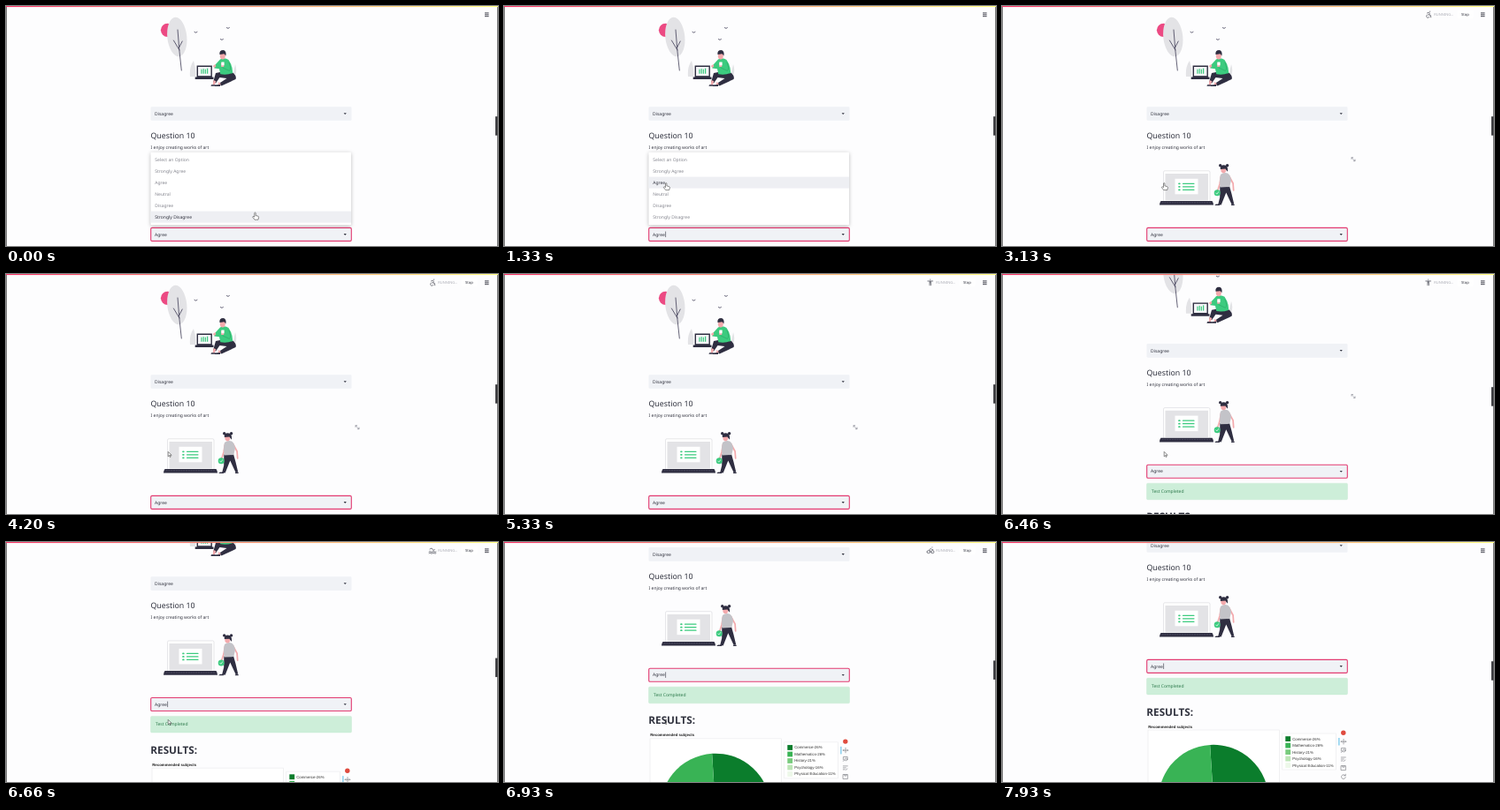
Animation of 556 by 272 pixels, one loop 8000 ms. Source, as an HTML page:

```html
<!DOCTYPE html>
<html lang="en">
<head>
<meta charset="utf-8">
<title>Survey page</title>
<style>
html, body { margin: 0; width: 100%; height: 100%; overflow: hidden; background: #fdfdfe; }
svg { display: block; width: 556px; height: 272px; }
text { font: 5px "Noto Sans", "Open Sans", sans-serif; fill: #31333f; text-rendering: geometricPrecision; }
text.h3 { font-size: 8.8px; }
text.h2 { font-size: 11.75px; font-weight: 700; }
text.plot { font: 4.35px "Liberation Sans", Arial, sans-serif; fill: #333; }
text.title { font-weight: 700; fill: #222; }
.line { fill: none; stroke-linecap: round; stroke-linejoin: round; }
.dark { fill: #2f2e41; } .green { fill: #3ccb7f; } .skin { fill: #f3a9ac; } .grey { fill: #e3e3e6; }
.menu { filter: drop-shadow(0 1px 2px #0004); }
</style>
</head>
<body>
<svg viewBox="0 0 556 272">
  <defs>
    <linearGradient id="bar"><stop stop-color="#f63366"/><stop offset="1" stop-color="#fffd80"/></linearGradient>
    <path id="caretDown" d="M381.6 -.8h3.2l-1.6 1.8z" fill="#31333f"/>
  </defs>

  <g id="page">
    <!-- man under a tree -->
    <circle cx="182.5" cy="27.3" r="7.6" fill="#ec4a83"/>
    <ellipse class="grey" cx="193.3" cy="35" rx="11" ry="22.3" transform="rotate(-6 193.3 35)"/>
    <path class="line" d="M194 27Q195.5 50 198.3 73M195.6 47l3.6-7M196 50l-6.6-11" stroke="#3f3d56" stroke-width=".8"/>
    <path class="line" d="M213 29.4l1.6.8 1.4-.9M249.4 24.6l1.6.8 1.4-.9M242.4 37.6l1.6.8 1.4-.9" stroke="#3f3d56" stroke-width=".8"/>
    <path class="grey" d="M208 80q-1-11 4-18q3 9 2 18zM256 80q2-9 3-14q3 8-1 16z"/>
    <path class="dark" d="M215.6 67.6h17.3v12.8h1.6v2.6h-20.800v-2.6h1.900z"/>
    <path d="M217 69h14.500v10.200h-14.500z" fill="#f4f5f7"/>
    <path class="line" d="M221 72.200v4M223.200 71.500v4.700M225.400 72.200v4M227.600 71v5.200" stroke="#3ccb7f" stroke-width="1.200"/>
    <path class="dark" d="M237 76q10-3 20 0q4 4 2.500 7l-16 7.500-3-2.500 9-6-8-1-4.500 6.500-3-1z"/>
    <path class="skin" d="M234.500 84l2.800 1.200-1.500 4h-2.200zM240.500 86l2.500 2.400-3.600 1.600z"/>
    <path class="dark" d="M232 89.200h4.500v1.600h-5zM236.500 89.500l5.500-.5v2h-6z"/>
    <path class="green" d="M242 60.500q5-2.500 9.500.5q4.500 6 4.800 15q-7 2.600-14 1.200l-1.300-6-5.500-.8q-1.500-2 .6-3.400z"/>
    <path class="line" d="M252 64q3 7 .5 9.500l-7.500-3.500" stroke="#31b56f" stroke-width="1"/>
    <path class="skin" d="M233.800 68l2.600-2 1 2.200-2 2zM243.200 64h3v5h-3z"/>
    <path d="M243.400 63.500h3.200v3.800h-3.200z" fill="#fff"/>
    <ellipse class="skin" cx="244.800" cy="56.500" rx="3" ry="4"/>
    <path class="dark" d="M241.400 55q-.6-5 4-5 4 .5 3 6.500l-1.800-2.200z"/>

    <!-- first select and second question -->
    <rect x="163.500" y="114.200" width="227" height="15.600" rx="1.300" fill="#f0f2f6"/>
    <text x="168" y="123.800">Disagree</text>
    <use href="#caretDown" y="122"/>
    <text class="h3" x="163.500" y="150">Question 10</text>
    <text x="163.600" y="161.800">I enjoy creating works of art</text>

    <!-- woman beside a laptop -->
    <rect x="182.500" y="186.800" width="52.500" height="35" rx="1.500" fill="#fff" stroke="#dcdce0" stroke-width=".7"/>
    <path class="grey" d="M184.500 190h48.500v30.500h-48.500z"/>
    <path d="M195.500 195.800h26v17.500h-26z" fill="#fff"/>
    <path class="line" d="M204.500 201.300h12.500M204.500 204.800h12.500M204.500 208.300h12.500" stroke="#3ccb7f" stroke-width="1.200"/>
    <path class="line" d="M200 201.300h.8M200 204.800h.8M200 208.300h.8" stroke="#3ccb7f" stroke-width="1.700"/>
    <path class="dark" d="M179.500 221h58q1.500 2 1.500 4.600h-61q0-2.600 1.500-4.600z"/>
    <path class="line" d="M181 222.800h55" stroke="#55546a" stroke-width=".7" stroke-dasharray="1.200 1.600"/>
    <path class="line" d="M256.500 192.500l4.600 8.500.6 8M247.500 193l-1.500 9-2.500 8" stroke="#f3a9ac" stroke-width="1.700"/>
    <path class="dark" d="M246.300 204.500l10.700-.5 2.500 9 2.700 11.300-2.600.6-6.300-13.500-5.600 14.200-3.500-.6 2-8z"/>
    <path class="dark" d="M242 224.600l4 .2v1.300h-5.800zM259.600 224.600h2.800l.4 1.500h-4z"/>
    <path d="M247 191q3.500-3 8-1.500 3.200 2 4 8l-1.700 7.500-10.600.5q-1.400-8 .3-14.500z" fill="#c3c3c8"/>
    <ellipse class="skin" cx="250.300" cy="185.600" rx="3" ry="3.800"/>
    <path class="dark" d="M246.800 185q-.6-4.600 4-4.700 5 .2 4.200 7.500l-2.600-3.200z"/>
    <circle class="dark" cx="246.700" cy="180.800" r="1.700"/><circle class="dark" cx="254.600" cy="180.800" r="1.700"/>
    <circle class="green" cx="243.200" cy="211.800" r="3.500"/>
    <path class="line" d="M241.700 212l1.100 1.200 2-2.600" stroke="#fff" stroke-width=".7"/>
    <path id="expand" class="line" d="M395 173.400v-1.700h1.700M395.200 171.900l1.500 1.500M399 174v1.700h-1.700M398.800 175.500l-1.500-1.500" stroke="#777985" stroke-width=".6"/>

    <!-- focused select -->
    <rect x="163.700" y="251.400" width="226.600" height="15" rx="1.300" fill="#f0f2f6" stroke="#e23a70" stroke-width="1.100"/>
    <text x="168" y="260.500">Agree</text>
    <path id="caret" d="M182.600 255.500v6.500" stroke="#31333f" stroke-width=".6"/>
    <use href="#caretDown" y="258.900"/>

    <!-- results -->
    <rect x="163.500" y="272.300" width="227" height="18.600" rx="1.300" fill="#cdeed9" stroke="#c2e8d0" stroke-width=".4"/>
    <text x="169" y="283.300" style="fill:#2d7a4c">Test Completed</text>
    <text class="h2" x="163.300" y="314.600">RESULTS:</text>
    <text class="plot title" x="165.200" y="328.500">Recommended subjects</text>
    <rect x="165" y="331" width="148.500" height="148" fill="#fff" stroke="#e4e4e6" stroke-width=".5"/>
    <g id="pie"></g>
    <rect x="316.800" y="335" width="60.500" height="41" fill="#fff" stroke="#e6e6e8" stroke-width=".5"/>
    <g id="legend"></g>
    <circle cx="385.800" cy="334.200" r="2.700" fill="#df4b3f"/>
    <path d="M380.900 340v8.500" stroke="#26aae1" stroke-width=".8"/>
    <g class="line" stroke="#85868c" stroke-width=".7">
      <path d="M383.200 344.200h5.600M386 341.400v5.600M384 343.400l-.8.800.8.800M388 343.400l.8.800-.8.800"/>
      <path d="M383.400 355v-3.400h4.800v2.500M383.400 356.500l1.600-1.600"/><circle cx="386.500" cy="354.500" r="1.400"/>
      <path d="M383.300 362h5M383.300 364h3M383.300 366h2M388 365l-1.600 1.400"/>
      <path d="M383.400 371.600h5v5h-5zM384.800 371.600v1.500h2.200v-1.500"/>
      <path d="M387.800 382.600a2.400 2.400 0 1 0 .5 2M388.300 381.200v1.600h-1.600"/>
    </g>
  </g>

  <g id="menu">
    <rect class="menu" x="163.500" y="165.800" width="226.500" height="82.400" rx="1" fill="#fff"/>
    <rect id="hover" x="163.500" width="226.500" height="13" fill="#eeeff3"/>
    <g id="options"></g>
  </g>

  <g id="status">
    <path id="icon" class="line" stroke="#6f7079" stroke-width=".9"/>
    <text x="488.300" y="11" style="font-size:4px;fill:#a9aab3">RUNNING...</text>
    <rect x="514.500" y="4.800" width="18" height="9" rx="1" fill="#fff"/>
    <text x="519" y="11" style="font-size:4.200px">Stop</text>
  </g>
  <path d="M541 7.900h4.600M541 9.800h4.600M541 11.700h4.600" stroke="#31333f" stroke-width=".9"/>
  <rect id="thumb" x="553" width="2.300" height="21.500" fill="#3c3c40"/>
  <path d="M.3 0v272M555.700 0v272" stroke="#111" stroke-width=".7"/>
  <rect width="556" height="1.100" fill="url(#bar)"/>

  <g id="cursor" fill="#fff" stroke="#222" stroke-width=".5" stroke-linejoin="round">
    <path id="hand" d="M-.7.500q.7-.9 1.400 0v3l2.800.7q.8.400.6 1.500l-.6 2.500h-4l-2.300-3q.2-1.200 1.400-.6l.7.600z"/>
    <path id="arrow" d="M0 1v5.400l1.300-1.200.8 1.900.9-.4-.8-1.800h1.700z"/>
    <path id="beam" fill="none" d="M-.9.800h1.800M0 .800v5.200M-.9 6h1.800"/>
  </g>
</svg>
<script>
const $ = id => document.getElementById(id);
const clamp = v => Math.max(0, Math.min(1, v));
const ramp = (t, from, to) => clamp((t - from) / (to - from));
const smooth = u => u * u * (3 - 2 * u);
const show = (id, on) => $(id).setAttribute('opacity', +on);

const options = ['Select an Option', 'Strongly Agree', 'Agree', 'Neutral', 'Disagree', 'Strongly Disagree'];
$('options').innerHTML = options.map((s, i) => `<text x="168.300" y="${176 + 13 * i}">${s}</text>`).join('');
const rows = [...$('options').children];

const subjects = [
  ['Commerce', 26, '#0b7d2c'], ['Mathematics', 26, '#39b355'], ['History', 21, '#78cb7d'],
  ['Psychology', 16, '#bce5b6'], ['Physical Education', 11, '#edf8e9']
];
let turn = 0;
const rim = p => {
  const a = p / 50 * Math.PI;
  return `${239 + 62.2 * Math.cos(a)} ${410 - 62.2 * Math.sin(a)}`;
};
subjects.forEach(([name, share, color], i) => {
  const y = 338.2 + 7.5 * i;
  $('pie').innerHTML += `<path fill="${color}" d="M239 410L${rim(turn)}A62.2 62.2 0 0 0 ${rim(turn += share)}z"/>`;
  $('legend').innerHTML += `<rect x="320.300" y="${y}" width="5.800" height="5.800" fill="${color}"/>
    <text class="plot" x="328.200" y="${y + 4.4}">${name}-${share}%</text>`;
});

// runner, cyclist, wheelchair, standing figure, swimmer
const icons = [
  'M483.500 6h.3M480 8.500l2-1 1.500.5-1 2.500 1.500 1-.5 2M482.500 10.500l-1 1.500-2-.3M483.500 8l1 1.200 1.200.2',
  'M478 11.200a1.600 1.600 0 1 0 3.200 0 1.600 1.600 0 1 0-3.200 0M482.700 11.200a1.600 1.600 0 1 0 3.200 0 1.600 1.600 0 1 0-3.200 0M482 12v-1.800l-1.500-1.200 1.800-1.700 1.200 1.400h1.300M483.800 6h.2',
  'M483.500 6.200h.3M480.500 8l2-.8.9.9-1.400 2h2.200l.5 2.700M481 9.800a1.800 1.800 0 1 0 2 2.600',
  'M481.600 6.200h.2M478.800 8h5.800M481 8.300v4.500M482.400 8.300v4.500M481.700 8.300v2',
  'M484 8.500h.3M479 8l2-1 2.500 3M478 11q1-1 2 0t2 0 2 0 2 0M478 12.700q1-1 2 0t2 0 2 0 2 0'
];

function draw(t) {
  const u = ramp(t, 6322, 7179);
  const scroll = 118 * (1 - (1 - u) ** 2);
  $('page').setAttribute('transform', `translate(0 ${-scroll})`);
  $('thumb').setAttribute('y', 125.2 + scroll * .085);

  const move = smooth(ramp(t, 60, 1000));
  const x = 281.5 - 98.3 * move, y = 234 - 33.6 * move;
  $('cursor').setAttribute('transform', `translate(${x} ${y})`);
  show('cursor', t < 4230 || (t > 5960 && t < 7200));
  const overTitle = scroll > 101 && scroll < 116;
  show('hand', t < 3560);
  show('arrow', t >= 3560 && !overTitle);
  show('beam', t >= 3560 && overTitle);

  const row = Math.max(0, Math.min(5, Math.floor((y - 167.5) / 13)));
  $('hover').setAttribute('y', 167.6 + 13 * row);
  rows.forEach((r, i) => r.style.fill = i === row ? '#31333f' : '#85868f');
  show('menu', t < 2260);

  $('expand').setAttribute('opacity', ramp(t, 2300, 2500) * (1 - ramp(t, 6440, 6640)));
  show('caret', (t - 1325 + 2124) % 1062 < 500);
  $('status').setAttribute('opacity', ramp(t, 2720, 2860) * (1 - ramp(t, 7180, 7260)));
  $('icon').setAttribute('d', icons[Math.max(0, Math.floor((t - 2720) / 200)) % 5]);
}

const start = performance.now();
function tick() {
  draw((performance.now() - start) % 8000);
  requestAnimationFrame(tick);
}
tick();
</script>
</body>
</html>
```
